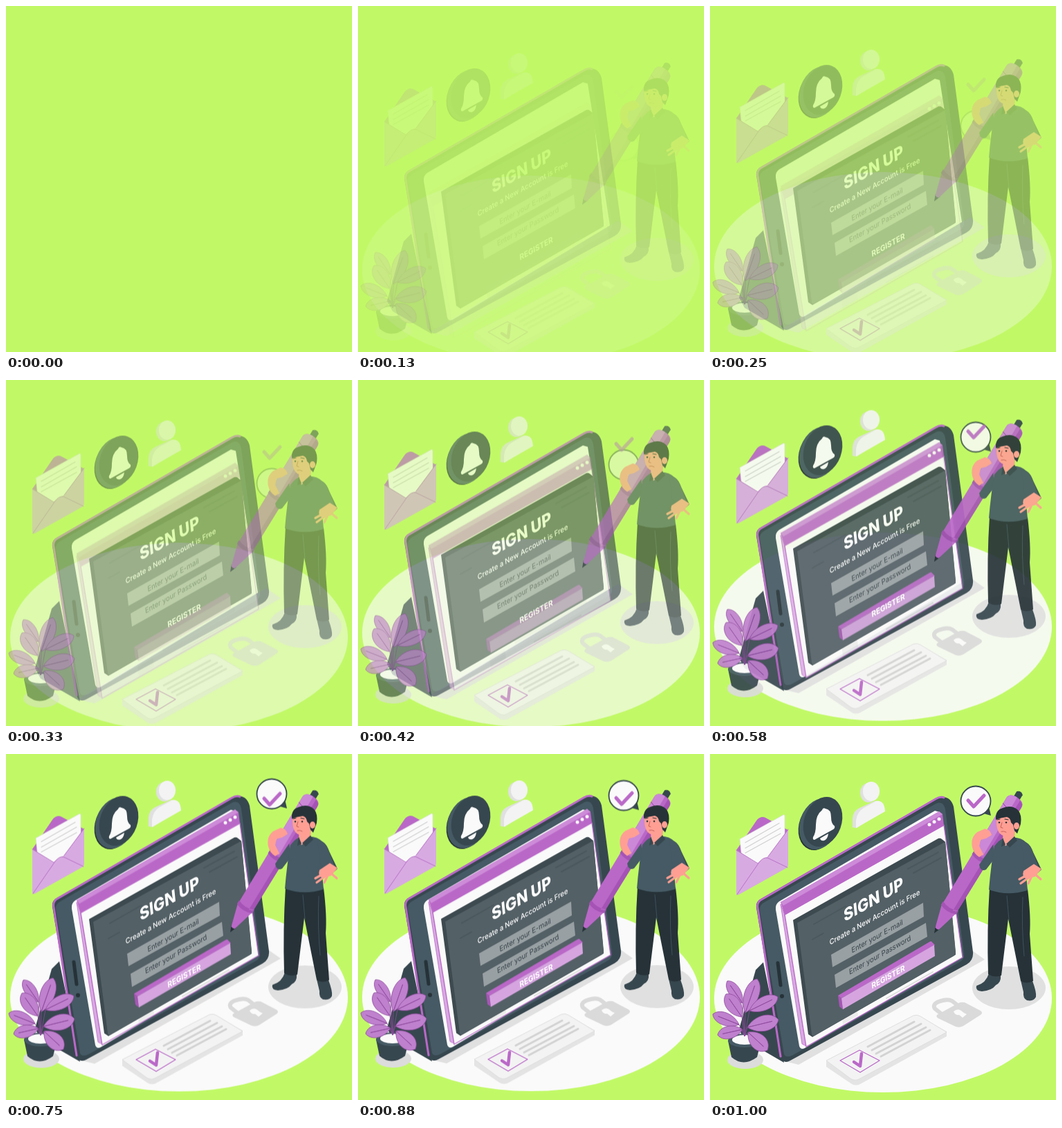
These frames come from a looping animation (500x500 px, 1.04 s). An HTML page:

```html
<!DOCTYPE html>
<html lang="en">
<head>
<meta charset="utf-8">
<title>Sign up</title>
<style>
  html, body { margin: 0; width: 100%; height: 100%; overflow: hidden; background: #c1f966; }
  svg { display: block; width: 100vw; height: 100vh; }
  text { font-family: Inter, Roboto, sans-serif; text-anchor: middle; }

  /* Entry lasts 1000 ms of the 1040 ms loop and overshoots a little.
     Nested parts fade and rise a second time inside their group. */
  .scene { animation: rise 1040ms infinite; }
  .scene > * { animation: fade 1040ms linear infinite; }
  .lift { animation: fade 1040ms linear infinite, rise 1040ms infinite; }
  .bubble { animation: fade 1040ms linear infinite, pop 1040ms linear infinite; }
  @keyframes rise {
    0% { transform: translateY(30px); animation-timing-function: cubic-bezier(.36, -.01, .5, 1.38); }
    96.15%, 100% { transform: translateY(0); }
  }
  @keyframes fade {
    0%, 5.5% { opacity: 0; }
    60%, 100% { opacity: 1; }
  }
  @keyframes pop {
    0% { transform: translateY(115px); }
    12.5% { transform: translateY(106px); }
    24% { transform: translateY(82px); }
    40.4% { transform: translateY(42px); }
    55.8% { transform: translateY(11px); }
    64.4% { transform: translateY(-3px); }
    72.1% { transform: translateY(-9px); }
    78% { transform: translateY(-10px); }
    96.15%, 100% { transform: translateY(0); }
  }

  .night { fill: #263238; }
  .dark { fill: #37474f; }
  .slate { fill: #455a64; }
  .purple { fill: #ba68c8; }
  .lilac { fill: #d8aae2; }
  .skin { fill: #ff9f94; }
  .paper { fill: #fafafa; }
  .mist { fill: #e0e0e0; }
  .line { fill: none; stroke-linecap: round; stroke-linejoin: round; }
</style>
</head>
<body>
<svg viewBox="0 0 500 500" preserveAspectRatio="none">
<g class="scene">
  <ellipse class="paper" cx="250" cy="353" rx="244" ry="136"/>
  <ellipse class="mist" cx="432" cy="338" rx="53" ry="31"/>
  <path class="mist" d="M376 282L397 297L128 449L104 443Z"/>

  <!-- card -->
  <g>
    <path fill="#e4e4e4" d="M168 443L299 377L342 401V408L217 477Q211 480 205 477L168 452Z"/>
    <path fill="#f3f3f3" stroke="#dedede" d="M168 443L294 378Q299 376 304 379L342 402L215 470Q209 473 203 469Z"/>
    <path class="line" stroke="#ba68c8" stroke-width="1.3" d="M188 443L216 428L245 443L217 460Z"/>
    <path class="line" stroke="#ba68c8" stroke-width="4.5" stroke-linecap="butt" d="M208 445L217 451L219 433"/>
    <path class="line" stroke="#d3d3d3" stroke-width="3" stroke-linecap="butt" d="M228 423L295 387M234 428L305 390M240 433L312 395M247 437L318 399"/>
  </g>

  <!-- padlock -->
  <g>
    <path class="line" stroke="#dadada" stroke-width="6" d="M335 376L325 368Q321 362 330 358Q343 353 350 357L359 364"/>
    <path fill="#dadada" d="M328 377L359 360Q363 358 368 359L391 371Q395 374 391 377L366 393Q361 396 355 394L330 382Q326 380 328 377Z"/>
    <path class="paper" d="M352 372Q358 367 363 371Q366 374 371 376L365 381L360 377Q354 378 352 372Z"/>
  </g>

  <path class="dark" d="M77 301L66 312L42 398L50 413L107 446Z"/>

  <!-- tablet with window and form -->
  <g>
    <path class="dark" d="M67 222Q66 213 74 209L328 63Q347 58 352 76L380 286Q381 298 371 304L116 443Q107 448 103 440Z"/>
    <path class="slate" d="M72 226Q71 218 79 214L326 72Q337 67 340 80L367 289Q368 297 360 301L120 435Q110 440 107 434Z"/>
    <path class="line" stroke="#ba68c8" stroke-width="3" d="M102 437L69 223Q67 214 75 210L326 65Q333 61 338 63"/>
    <path class="paper" d="M95 225Q94 217 100 213L325 82L332 84L364 289L137 425Q131 428 129 422Z"/>
    <path class="line" stroke="#263238" stroke-width="5" d="M98 302L102 334"/>
    <circle class="night" cx="104" cy="350" r="3"/>

    <g class="lift">
      <path class="lilac" stroke="#ba68c8" stroke-width=".8" d="M102 217L108 232L139 422L133 419Z"/>
      <path class="paper" stroke="#ba68c8" stroke-width="1.3" d="M108 232L338 103L365 294L139 423Z"/>
      <path fill="#ececec" d="M190 377L212 365L214 378L192 391ZM226 350L330 291L331 297L227 356Z"/>
      <path class="line" stroke="#ddd" stroke-width="2" d="M255 353L322 315"/>
      <path class="purple" d="M102 214L331 83L336 87L338 103L108 233Z"/>
      <path fill="#cd8bd8" d="M102 214L331 83L336 87L106 219Z"/>
      <g class="paper"><circle cx="317" cy="102" r="2.5"/><circle cx="324" cy="98" r="2.5"/><circle cx="331" cy="94" r="2.5"/></g>
    </g>

    <path fill="#3d4a50" d="M120 240L330 122Q333 121 335 123L340 127L355 290L148 409L142 405Z"/>
    <path fill="#536066" d="M126 244L340 127L355 286Q355 290 352 292L151 407Q148 409 147 405Z"/>
    <path class="line" stroke="#4b585e" stroke-width="2" d="M286 166L330 142M294 172L334 150M150 246L196 220M148 268L164 259"/>
    <path fill="#fff" fill-opacity=".4" d="M175 290L308 215L309 235L177 308ZM180 319L312 244L314 264L182 338Z"/>
    <g class="lift">
      <path fill="#a656b5" d="M185 349L190 353L192 369L187 365Z"/>
      <path class="purple" d="M185 349L318 271Q320 270 321 272L325 276L190 353Z"/>
      <path fill="#d6a5e0" d="M190 353L324 276L325 292L192 369Z"/>
    </g>
    <text transform="matrix(.87 -.49 .1 1 237 218.5)" font-size="24.3" font-weight="800" fill="#fff">SIGN UP</text>
    <text transform="matrix(.87 -.49 .12 1 238.5 239.5)" font-size="10.6" font-weight="500" fill="#fff">Create a New Account is Free</text>
    <text transform="matrix(.87 -.49 .12 1 242 267)" font-size="10.5" fill="#37434a">Enter your E-mail</text>
    <text transform="matrix(.87 -.49 .12 1 246 294)" font-size="10.5" fill="#37434a">Enter your Password</text>
    <text transform="matrix(.87 -.49 .12 1 258 326)" font-size="11.3" font-weight="700" fill="#fff">REGISTER</text>
  </g>

  <!-- plant -->
  <g>
    <ellipse fill="#dcdcdc" cx="51" cy="442" rx="26" ry="13"/>
    <path class="dark" d="M26 414L31 438Q48 453 68 438L74 414Z"/>
    <ellipse class="slate" cx="50" cy="414" rx="24" ry="10"/>
    <ellipse class="paper" cx="50" cy="413" rx="18" ry="7"/>
    <g id="leaves" fill="#bf80ce" stroke="#8d4b9c" stroke-width=".8"></g>
  </g>

  <!-- envelope -->
  <g>
    <path class="purple" d="M38 139L68 95Q74 89 80 92L113 110L76 160Z"/>
    <path class="paper" stroke="#ddd" stroke-width=".7" d="M43 123L106 88Q108 87 108 90L108 140L75 163L46 150Z"/>
    <path class="line" stroke="#d0d0d0" stroke-width="1.2" d="M51 128L100 100M51 136L102 107M51 143L102 115"/>
    <path class="lilac" d="M38 139L68 158L76 152L84 148L113 109V160Q113 163 110 165L42 203Q38 205 38 201Z"/>
    <path class="line" stroke="#b774c5" stroke-width="1" d="M38 139L69 158M84 148L113 109M39 203L70 158Q76 149 83 150L112 164"/>
  </g>

  <!-- bell -->
  <g>
    <ellipse class="night" cx="156" cy="103" rx="27" ry="37" transform="rotate(20 156 103)"/>
    <ellipse class="slate" cx="158" cy="101" rx="28" ry="38" transform="rotate(20 158 101)"/>
    <ellipse class="dark" cx="163" cy="98" rx="27" ry="37" transform="rotate(20 163 98)"/>
    <path class="paper" d="M162 81Q163 77 167 79Q175 80 175 91Q175 101 180 104Q181 107 178 109L151 124Q148 124 149 120Q153 114 153 102Q153 88 162 81Z"/>
    <path class="paper" d="M159 122L171 115Q170 123 165 125Q160 126 159 122Z"/>
  </g>

  <!-- avatar -->
  <g>
    <g class="mist"><ellipse cx="229" cy="56" rx="12" ry="14"/><path d="M206 106V93Q207 82 216 78L238 68Q249 66 250 82L212 107Z"/></g>
    <g fill="#f3f3f3"><ellipse cx="233" cy="54" rx="12" ry="14"/><path d="M211 107V96Q213 83 222 78L240 68Q252 66 253 83Z"/></g>
  </g>

  <!-- man with pen and speech bubble -->
  <g>
    <g class="bubble">
      <path class="dark" d="M392 85L406 89L403 76Z"/>
      <circle class="paper" cx="384" cy="68" r="21.5" stroke="#37474f" stroke-width="1.8"/>
    </g>
    <path class="lift line" stroke="#ba68c8" stroke-width="5" stroke-linecap="butt" d="M373 67L381 76L396 60"/>

    <g transform="translate(324 259) rotate(31.4)">
      <path class="dark" d="M-5 -226V-237Q0 -242 5 -237V-226Z"/>
      <path class="night" d="M0 0L-4 -10H4Z"/>
      <path class="purple" d="M-3 -8L-12 -40H12L3 -8Q0 -6 -3 -8Z"/>
      <path class="purple" d="M-12 -44L-13 -222Q-12 -230 0 -230Q12 -230 13 -222L12 -44Q0 -38 -12 -44Z"/>
      <path fill="#cb88d7" d="M-12 -132L-13 -222Q-12 -230 0 -230L2 -132Z"/>
      <path fill="#a553b5" d="M6 -42V-228Q13 -226 13 -220L12 -44ZM-13 -40Q0 -34 13 -40V-46Q0 -40 -13 -46ZM-13 -126Q0 -120 13 -126V-132Q0 -126 -13 -132Z"/>
      <path class="line" stroke="#9b4bab" stroke-width="1" d="M-13 -212Q0 -206 13 -212"/>
    </g>

    <path class="dark" d="M403 317L420 320Q421 330 413 334Q407 342 393 343Q383 342 385 335Q399 331 403 317Z"/>
    <path class="dark" d="M449 327L466 328Q472 344 471 351Q468 358 458 356Q452 353 453 344Z"/>
    <path class="night" d="M404 193L459 195Q464 236 462 260L467 328Q457 333 449 328L431 238L421 320Q411 324 402 318Q400 255 404 193Z"/>
    <path class="line" stroke="#455a64" stroke-width=".8" d="M429 205L432 240M452 207Q450 250 454 292"/>
    <path class="slate" d="M409 131L389 160Q391 171 399 167L412 150Z"/>
    <path class="skin" d="M379 135Q376 121 386 113L397 108Q405 109 407 117L399 122L391 124L389 133L395 145L389 149Q381 144 379 135Z"/>
    <path class="slate" d="M411 133Q418 124 425 121L443 121Q456 123 461 134Q466 160 457 176L459 197Q430 206 403 196Q406 160 411 133Z"/>
    <path class="skin" d="M423 111H441L440 123L427 133Q423 128 423 111Z"/>
    <path class="dark" d="M440 119L444 125L433 135L428 130ZM423 121L427 131L421 134Z"/>
    <path class="line" stroke="#ff9f94" stroke-width="3.2" d="M458 175L447 181M460 179L449 187M464 179L460 187M470 174L478 181"/>
    <path class="dark" d="M451 126Q462 127 467 142L479 167Q470 177 459 177L456 164Z"/>
    <path class="slate" d="M450 125Q461 127 466 140L475 164Q468 173 459 173L454 160Z"/>
    <path class="skin" d="M453 169L468 159L479 166L470 177L458 181Q450 178 453 169Z"/>
    <path class="skin" d="M414 93Q422 84 438 89L445 102L440 114Q432 121 424 118Q413 115 414 93Z"/>
    <path class="night" d="M413 95Q412 81 423 78Q436 73 445 81Q451 88 449 101L444 115L440 111L438 102L435 99Q434 92 429 91Q420 92 413 95Z"/>
    <ellipse class="skin" cx="443" cy="104" rx="4" ry="5"/>
    <g class="night"><circle cx="418" cy="99" r="1.3"/><circle cx="428" cy="99" r="1.3"/></g>
    <path class="line" stroke="#263238" stroke-width="1.2" d="M415 95L419 94M426 94L431 95"/>
    <path class="line" stroke="#c7605b" stroke-width="1" d="M422 99L420 106L423 107M421 112Q425 111 428 113"/>
  </g>
</g>
</svg>
<script>
  // Each leaf: base x, base y, tip x, tip y, bulge
  const leaves = [
    [47, 360, 25, 328, 11], [51, 374, 68, 325, 14], [46, 380, 23, 347, 14],
    [57, 371, 98, 351, 13], [42, 391, 4, 376, 12], [47, 398, 11, 406, 12],
    [54, 395, 99, 384, 15], [55, 402, 83, 428, 15]
  ];
  const leaf = ([x, y, tx, ty, w]) => {
    const dx = tx - x, dy = ty - y, len = Math.hypot(dx, dy);
    const nx = -dy / len * w, ny = dx / len * w;
    const ctrl = (k, side) => `${x + dx * k + nx * side} ${y + dy * k + ny * side}`;
    return `<path d="M50 408L${x} ${y}C${ctrl(.3, 1)} ${ctrl(.85, 1)} ${tx} ${ty}` +
      `C${ctrl(.85, -1)} ${ctrl(.3, -1)} ${x} ${y}L${x + dx * .8} ${y + dy * .8}L${x} ${y}"/>`;
  };
  document.getElementById("leaves").innerHTML = leaves.map(leaf).join("");
</script>
</body>
</html>
```
